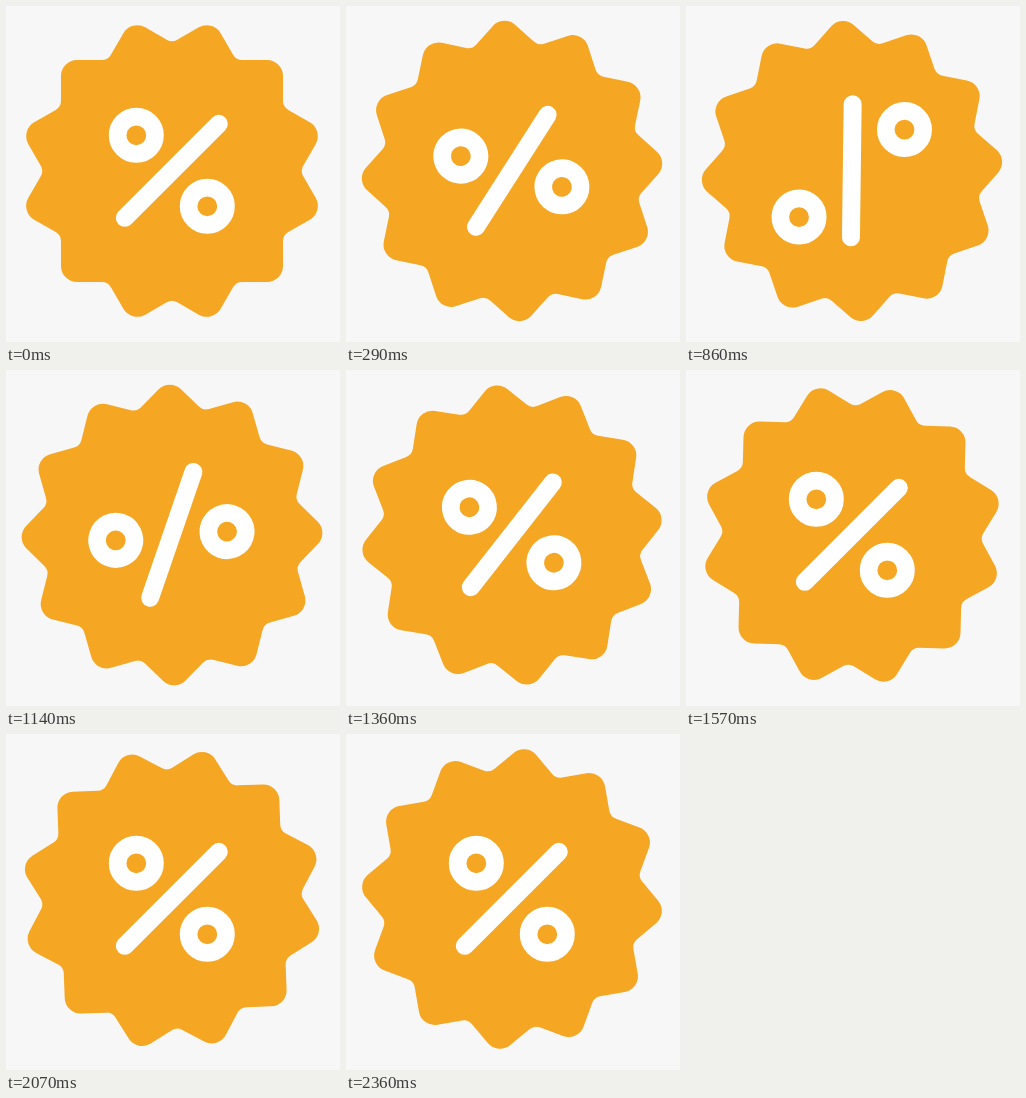
Recreate the animation shown at these times as an HTML page. Size 334 px wide and 336 px high, loop 2430 ms.

```html
<!DOCTYPE html>
<html lang="en">
<head>
<meta charset="utf-8">
<title>Discount badge</title>
<style>
  html, body { margin: 0; width: 100%; height: 100%; overflow: hidden; background: #f7f7f7; }
  svg { display: block; width: 100%; height: 100%; }
</style>
</head>
<body>
<svg viewBox="0 0 334 336">
  <path id="badge" fill="#f5a623"/>
  <g id="percent" fill="none" stroke="#fff">
    <path d="M0 -66.5V66.5" stroke-width="18" stroke-linecap="round"/>
    <circle id="ringA" r="18.7" stroke-width="17.6"/>
    <circle id="ringB" r="18.7" stroke-width="17.6"/>
  </g>
</svg>
<script>
const LOOP = 2430, FPS = 14, LAST = 33;
const SWING = 11; // ticks for the percent sign to swing one way
const $ = id => document.getElementById(id);
const badge = $('badge'), percent = $('percent'), ringA = $('ringA'), ringB = $('ringB');

// Twelve-pointed star with rounded tips and notches
function starPath() {
  const pts = Array.from({ length: 24 }, (_, i) => {
    const tip = i % 2 === 1, a = i * Math.PI / 12, r = tip ? 157 : 128.2;
    return { x: r * Math.sin(a), y: -r * Math.cos(a), tip };
  });
  const toward = (p, q, d) => {
    const k = d / Math.hypot(q.x - p.x, q.y - p.y);
    return `${(p.x + (q.x - p.x) * k).toFixed(2)} ${(p.y + (q.y - p.y) * k).toFixed(2)}`;
  };
  return pts.map((p, i) => {
    const prev = pts[(i + 23) % 24], next = pts[(i + 1) % 24];
    const r = p.tip ? 16 : 10.5, cut = p.tip ? 16 : 6.06;
    return `${i ? 'L' : 'M'}${toward(p, prev, cut)}A${r} ${r} 0 0 ${p.tip ? 1 : 0} ${toward(p, next, cut)}`;
  }).join('') + 'Z';
}

function bezier(x1, y1, x2, y2) {
  const at = (t, a, b) => 3 * (1 - t) ** 2 * t * a + 3 * (1 - t) * t * t * b + t ** 3;
  return x => {
    if (x <= 0) return 0;
    if (x >= 1) return 1;
    let lo = 0, hi = 1;
    for (let i = 0; i < 30; i++) {
      const mid = (lo + hi) / 2;
      if (at(mid, x1, x2) < x) lo = mid; else hi = mid;
    }
    return at(lo, y1, y2);
  };
}

const turnEase = bezier(.42, 0, .58, 1);
const slideEase = bezier(.46, 0, .41, 1);

// Badge spin: [tick, degrees, degrees per tick], slow at both ends
const spin = [
  [0, 0, 1.8], [8, 34.7, 7.3], [12, 71.2, 12.4], [16, 134.1, 16.8],
  [22, 241.5, 15.6], [29, 327.8, 8], [33, 350.1, 3.6]
];

function spinAt(tick) {
  let i = 0;
  while (i < spin.length - 2 && tick >= spin[i + 1][0]) i++;
  const [t0, a, va] = spin[i], [t1, b, vb] = spin[i + 1];
  const d = t1 - t0, u = (tick - t0) / d, w = 1 - u;
  return w * w * (1 + 2 * u) * a + u * u * (1 + 2 * w) * b + u * w * d * (w * va - u * vb);
}

// Out and back: eased both ways, then at rest
const swing = (ease, tick) =>
  tick <= SWING ? ease(tick / SWING) : 1 - ease((tick - SWING) / SWING);

function place(ring, x, y) {
  ring.setAttribute('cx', x);
  ring.setAttribute('cy', y);
}

function draw(ms) {
  const tick = Math.min(LAST, Math.floor((ms % LOOP + 5) * FPS / 1000));
  const turn = swing(turnEase, tick), slide = swing(slideEase, tick);
  badge.setAttribute('transform', `translate(166 165) rotate(${spinAt(tick)})`);
  percent.setAttribute('transform', `translate(165.8 164.8) rotate(${45 - 45 * turn})`);
  const out = 50.2 + 2 * slide;
  place(ringA, -out, 47.6 * slide);
  place(ringB, out, -42.5 * slide);
}

badge.setAttribute('d', starPath());
const start = performance.now();
function loop() {
  draw(performance.now() - start);
  requestAnimationFrame(loop);
}
loop();
</script>
</body>
</html>
```
